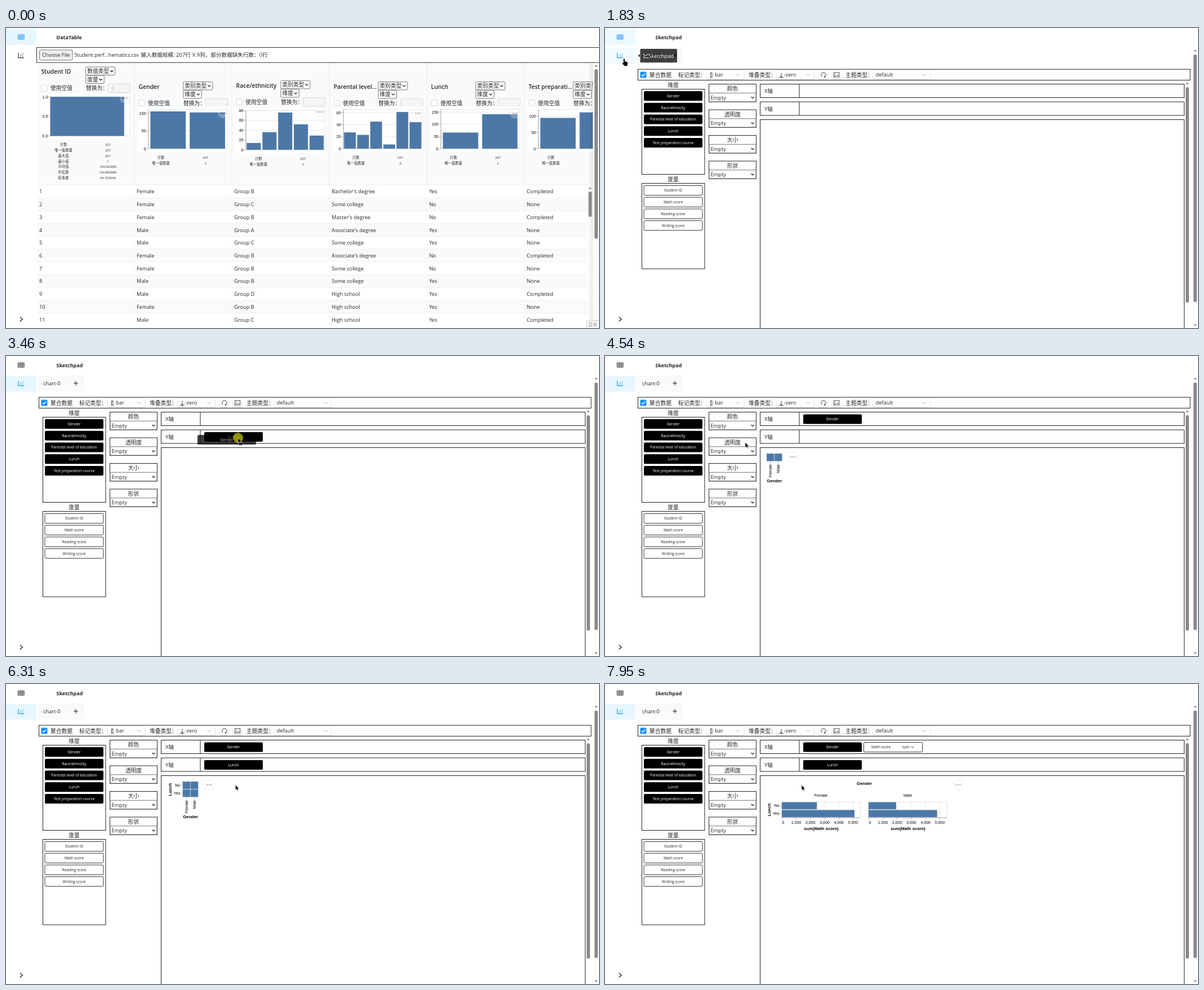
An HTML page for the animation above (8000 ms loop, 1053 by 532 pixels).

```html
<!DOCTYPE html>
<html lang="en">
<head>
<meta charset="utf-8">
<title>Data sketchpad</title>
<style>
html, body { margin: 0; height: 100%; overflow: hidden; background: #fff; }
svg { display: block; width: 100vw; height: 100vh; }
text { font-family: 'Open Sans', 'Noto Sans CJK SC', 'Noto Sans CJK', 'Noto Sans', sans-serif; fill: #262626; white-space: pre; }
text.v { font-family: 'Liberation Sans', Arial, sans-serif; fill: #000; }
</style>
</head>
<body>
<svg id="stage" viewBox="0 0 1053 532"></svg>
<script>
const BLUE = '#4c78a8', ACTIVE = '#1890ff';
const M = 'text-anchor="middle"', E = 'text-anchor="end"';

// y is the vertical middle of the text
const txt = (x, y, s, size = 9.25, attr = '') =>
  `<text x="${x}" y="${(y + size * .36).toFixed(2)}" font-size="${size}" ${attr}>${s}</text>`;
const vtxt = (x, y, s, size = 7, attr = M) => txt(x, y, s, size, 'class="v" ' + attr);
const up = (x, y, s, size, attr) => `<g transform="translate(${x} ${y}) rotate(-90)">${vtxt(0, 0, s, size, attr)}</g>`;
const box = (x, y, x2, y2, fill = 'none', stroke = 'none', r = 0, w = 1) =>
  `<rect x="${x}" y="${y}" width="${x2 - x}" height="${y2 - y}" rx="${r}" fill="${fill}" stroke="${stroke}" stroke-width="${w}"/>`;
const path = (d, stroke = '#333', w = 1, fill = 'none', attr = '') =>
  `<path d="${d}" stroke="${stroke}" stroke-width="${w}" fill="${fill}" ${attr}/>`;
const group = (id, s, attr = '') => `<g id="${id}" ${attr}>${s}</g>`;
const chevron = (x, y, c = '#222', w = 1.3, r = 2.5) =>
  path(`M${x - r} ${y - r / 2}l${r} ${r}l${r} ${-r}`, c, w);
const arrow = (x, y, dir) => path(`M${x - 3} ${y + dir * 1.6}h6l-3 ${-dir * 3.4}z`, 'none', 0, '#8b8b8b');
const thumb = (x, y, y2) => box(x, y, x + 6, y2, '#8b8b8b', 'none', 3);

function nativeSelect(x, y, w, label) {
  return box(x, y - 7.2, x + w, y + 7.2, '#fff', '#767676', 1.5) +
    txt(x + 2.5, y, label, 9.75) + chevron(x + w - 6, y);
}
function flatSelect(x, x2, label, tx) {
  return box(x + .5, 74.5, x2, 91.5, '#fff', '#e2e2e2', 1) + txt(tx, 83, label, 9.4) + chevron(x2 - 11, 83, '#aaa', .9, 3.3);
}
function moreButton(x, y, id = '', opacity = .25) {
  const dots = [-3.6, 0, 3.6].map(d => `<circle cx="${x + d}" cy="${y}" r="1.4" fill="#111"/>`).join('');
  return `<g id="${id}" opacity="${opacity}"><circle cx="${x}" cy="${y}" r="9.3" fill="#fff" stroke="#999" stroke-width=".8"/>${dots}</g>`;
}
function pill(cx, cy, label, dark) {
  return box(cx - 52, cy - 8.6, cx + 52, cy + 8.6, dark ? '#000' : '#fff', dark ? 'none' : '#333', 2.2) +
    txt(cx, cy, label, 6.6, M + ` style="fill:${dark ? '#fff' : '#222'}"`);
}

// ---------- data table ----------
const columns = [
  { name: 'Student ID', top: 77, id: 'bStudent', bx: 211, by: 124.5 },
  { name: 'Gender', id: 'bGender', bx: 385.5, by: 151, ticks: [0, 50, 100], unit: .63, bars: [105, 102], kinds: 2 },
  { name: 'Race/ethnicity', top: 102, id: 'bRace', bx: 557.5, by: 149, ticks: [0, 20, 40, 60, 80], unit: .87, bars: [14, 36, 76, 52, 29], kinds: 5 },
  { name: 'Parental level...', id: 'bParent', bx: 731, by: 151.5, ticks: [0, 20, 40, 60], unit: 1.067, bars: [27, 23, 45, 7, 61, 44], kinds: 6 },
  { name: 'Lunch', id: 'bLunch', bx: 904, by: 151.5, ticks: [0, 50, 100, 150], unit: .433, bars: [66, 141], kinds: 2 },
  { name: 'Test preparati...', id: 'bTest', bx: 1077, by: 151.5, ticks: [0, 50, 100], unit: .575, bars: [95, 112], kinds: 2 }
];
const B = "Bachelor's degree", S = 'Some college', A = "Associate's degree", H = 'High school';
const rows = [
  ['Female', 'B', B, 1, 1], ['Female', 'C', S, 0, 0], ['Female', 'B', "Master's degree", 0, 1],
  ['Male', 'A', A, 1, 0], ['Male', 'C', S, 1, 0], ['Female', 'B', A, 0, 1], ['Female', 'B', S, 0, 0],
  ['Male', 'B', S, 1, 0], ['Male', 'D', H, 1, 1], ['Female', 'B', H, 1, 0], ['Male', 'C', H, 1, 1]
];

function headerCell(c, i) {
  const x = 55 + 173.1 * i, num = i === 0, mid = c.top || 104;
  const s1 = num ? 76.3 : mid - 1.4, base = num ? 191.5 : i === 2 ? 216 : 214;
  let s = txt(x + 7.4, mid + .5, c.name, 10.4, 'font-weight="600"');
  s += nativeSelect(x + 86.7, s1, 52, num ? '数值类型' : '类别类型') + nativeSelect(x + 86.7, s1 + 15, 32.5, num ? '度量' : '维度');
  const y = s1 + 30.4;
  s += box(x + 8, y - 5, x + 18, y + 5, '#fff', '#d9d9d9', 1) + txt(x + 24, y, '使用空值', 9.75) + txt(x + 87, y, '替换为：', 9.75);
  s += box(x + 126.5, y - 7.7, x + 165.5, y + 7.7, '#f5f5f5', '#d9d9d9', 1);
  if (num) s += txt(x + 132, y, '0', 9.25, 'style="fill:#bbb"');
  const left = x + (num ? 23.8 : 24.8), w = num ? 140.5 : 139.6, top = base - 69.5;
  s += box(x + 6, top - 5, x + 166, base + 6, '#fff');
  const ticks = c.ticks || [0, .5, 1], unit = c.unit || 69.5;
  for (const v of ticks) {
    const ty = base - v * unit;
    s += path(`M${left} ${ty}h${w}`, '#ddd', .7) + path(`M${left - 3.5} ${ty}h3.5`, '#888', .7) +
      vtxt(left - 4.5, ty, num ? v.toFixed(1) : v, 7, E);
  }
  s += box(left, top, left + w, base, 'none', '#ddd', 0, .7);
  if (num) s += box(left, top, left + 131, base, BLUE);
  else {
    const step = w / c.bars.length;
    c.bars.forEach((v, k) => s += box(left + step * (k + .05), base - v * unit, left + step * (k + .95), base, BLUE));
  }
  s += path(`M${left} ${top}V${base}`, '#888', .7) + moreButton(c.bx, c.by, c.id);
  const stats = [['计数', 207], ['唯一值数量', num ? 207 : c.kinds]];
  if (num) stats.push(['最大值', 207], ['最小值', 1], ['平均值', '104.000000'], ['中位数', '104.000000'], ['标准差', '59.755056']);
  stats.forEach(([k, v], n) => {
    const sy = (num ? 207.2 : base + 15.7) + n * (num ? 9.75 : 10.3);
    s += txt(x + 47, sy, k, 6.3, M + ' font-weight="500"') + txt(x + 126, sy, v, 5.8, M + ' font-weight="500"');
  });
  return s + path(`M${x + 173} 62V279`, '#ececec', 1);
}

function tableScene() {
  let s = txt(89.5, 17, 'DataTable', 9, 'font-weight="700"');
  let body = box(55, 62, 1042, 278.5, '#fafafa') + columns.map(headerCell).join('');
  rows.forEach((r, i) => {
    const top = 278.5 + 22.72 * i;
    body += box(55, top, 1032, top + 22.72, i % 2 ? '#fafafa' : '#fff') + path(`M55 ${top}H1032`, '#f0f0f0');
    const cells = [i + 1, r[0], 'Group ' + r[1], r[2], r[3] ? 'Yes' : 'No', r[4] ? 'Completed' : 'None'];
    cells.forEach((v, k) => body += txt(59 + 173.1 * k, top + 11.6, v) + path(`M${228 + 173.1 * k} ${top}v22.7`, '#f5f5f5'));
  });
  s += `<g clip-path="url(#tableClip)">${body}</g>` + box(1032, 279, 1042, 532, '#fcfcfc');
  s += box(1034, 62, 1042.5, 532, 'url(#edge)') + arrow(1037.5, 284, 1) + thumb(1034.3, 290, 335);
  s += box(1043, 62, 1053, 532, '#fcfcfc') + arrow(1048, 67, 1) + thumb(1045, 73, 374) + arrow(1048, 527, -1);
  s += box(54.5, 34.5, 1056, 61.2, '#fff', '#333') + box(59.5, 39, 118, 57, '#efefef', '#767676', 2);
  s += txt(64, 48, 'Choose File', 9.3) + txt(121.5, 48, 'Student perf...hematics.csv', 9.1);
  s += txt(239.5, 48, '输入数据规模: 207行 X 9列，部分数据缺失行数：0行', 9.6);
  return s + group('menuTip', box(1031, 519, 1056, 535, '#f9f9f9', '#ccc') + txt(1034, 526, '菜单', 8, 'style="fill:#999"'));
}

// ---------- sketchpad ----------
const dims = ['Gender', 'Race/ethnicity', 'Parental level of education', 'Lunch', 'Test preparation course'];
const measures = ['Student ID', 'Math score', 'Reading score', 'Writing score'];

function padScene() {
  let s = txt(89.5, 17, 'Sketchpad', 9, 'font-weight="700"');
  s += box(55, 35, 109, 62, '#fafafa') + txt(66, 48.5, 'chart-0', 9.4) + box(111.5, 35, 137.5, 62, '#fafafa', '#f3f3f3');
  s += path('M120.3 48.2h7.6M124.1 44.4v7.6', '#222', 1.1);
  s += box(58.5, 73.2, 1039, 92.5, '#fff', '#222') + box(62.5, 77.5, 73.5, 88.5, ACTIVE, 'none', 1.5) + path('M65.2 83l2.2 2.3 3.6-4.5', '#fff', 1.4);
  s += txt(79, 83, '聚合数据', 9.75) + txt(130, 83, '标记类型：', 9.75) + flatSelect(180, 247, 'bar', 195) + box(187.5, 79.5, 190, 87.5, 'none', '#333', 0, .9);
  s += txt(255, 83, '堆叠类型：', 9.75) + flatSelect(303.5, 371.5, '-zero', 317.5) + path('M309 87.5h8M313 87V79.5M311.3 84.8l1.7 2 1.7-2', '#333', .9);
  s += box(380, 74.5, 396, 91.5, '#fff', '#e2e2e2', 1) + path('M385.6 86.4a4.1 4.1 0 1 1 4.4 .2M389.5 84.7v2.4h2.4', '#333', 1);
  s += box(403, 74.5, 419, 91.5, '#fff', '#e2e2e2', 1) + box(406.5, 79, 415.8, 87, 'none', '#333', 0, .9) + path('M407 86l2.7-3 2 2 1.5-1.6 2.3 2.4M408.5 81h1.2', '#333', .8);
  s += txt(427, 83, '主题类型：', 9.75) + flatSelect(475.5, 578, 'default', 480.5);
  s += txt(121, 101, '维度', 9.75, M) + box(65.5, 108.5, 177, 259.5, '#fff', '#222') + dims.map((d, i) => pill(121, 120.5 + 20.75 * i, d, 1)).join('');
  s += txt(121, 268, '度量', 9.75, M) + box(65.5, 275.5, 177, 427, '#fff', '#222') + measures.map((d, i) => pill(121, 288 + 20.75 * i, d)).join('');
  ['颜色', '透明度', '大小', '形状'].forEach((d, i) => {
    const y = 99.5 + 45.5 * i;
    s += box(184.5, y, 268.5, y + 31.5, '#fff', '#222') + txt(226.5, y + 8.2, d, 9.75, M);
    s += box(185, y + 15.8, 268, y + 31, '#fff', '#767676') + txt(187.5, y + 24, 'Empty', 9.3) + chevron(262, y + 23.7);
  });
  [['X轴', 99.5], ['Y轴', 131]].forEach(([d, y]) =>
    s += box(275.5, y, 1028.5, y + 24, '#fff', '#222') + path(`M345 ${y}v24`, '#222') + txt(283, y + 12.5, d, 9.5));
  s += box(275.5, 162.5, 1028.5, 540, '#fff', '#222');
  s += arrow(1034, 98, 1) + thumb(1031, 105, 487) + arrow(1048, 40, 1) + thumb(1045, 47, 486) + arrow(1048, 527, -1);
  s += group('chart1', cells(287, 1) + moreButton(334, 179));
  s += group('chart2', cells(313.8, 2) + up(291, 187, 'Lunch', 7.7, M + ' font-weight="700"') + moreButton(361, 179));
  s += group('chart3', facets());
  s += group('xGender', pill(404, 112, 'Gender', 1)) + group('yLunch', pill(404, 143.5, 'Lunch', 1));
  s += group('xMath', box(459.5, 103.5, 563.5, 120.7, '#fff', '#333', 2.2) + txt(473, 112, 'Math score', 6.6) + txt(527.5, 112, 'sum', 6.6) + chevron(546, 112, '#222', .9));
  return s;
}
function rowLabels(x, y) {
  return ['No', 'Yes'].map((d, i) => vtxt(x - 4.6, y + 14 * i, d, 7, E) + path(`M${x - 3.5} ${y + 14 * i}h3.5`, '#888', .7)).join('');
}
function cells(x, n) {
  const end = 173 + 14 * n;
  let s = '';
  for (let r = 0; r < n; r++) for (let c = 0; c < 2; c++)
    s += box(x + 14 * c, 173 + 14 * r, x + 14 * c + 13.4, 186.4 + 14 * r, BLUE, '#b9c9da', 0, .5);
  ['Female', 'Male'].forEach((d, c) =>
    s += path(`M${x + 6.7 + 14 * c} ${end}v3.5`, '#888', .7) + up(x + 6.7 + 14 * c, end + 5, d, 7, E));
  if (n > 1) s += rowLabels(x, 179.7);
  return s + vtxt(x + 13.8, end + 34.3, 'Gender', 7.7, M + ' font-weight="700"');
}
function facets() {
  const bold = M + ' font-weight="700"';
  let s = vtxt(460.5, 176, 'Gender', 7.7, bold) + up(291, 223, 'Lunch', 7.7, bold) + rowLabels(314, 215.7);
  [['Female', 314, 62.3, 129], ['Male', 468, 49, 121.7]].forEach(([d, x, no, yes]) => {
    s += vtxt(x + 69.5, 197, d) + box(x, 209, x + 139.5, 237, '#fff', '#ddd', 0, .8);
    for (let k = 0; k < 6; k++) {
      const gx = x + .4 + 25.2 * k;
      s += path(`M${gx} 209v28`, '#ddd', .7) + path(`M${gx} 237v3.5`, '#888', .7);
      s += vtxt(k ? gx : gx + 2, 245.5, k ? k + ',000' : 0);
    }
    s += box(x, 209.6, x + no, 222.2, BLUE) + box(x, 223.4, x + yes, 236.2, BLUE) + path(`M${x} 237h139.5`, '#888', .7);
    s += vtxt(x + 70, 256, 'sum(Math score)', 7.7, bold);
  });
  return s + moreButton(627, 179);
}

// ---------- sidebar, tooltip, pointer ----------
const sidebar = box(0, 0, 54, 532, '#fff') +
  group('item1', box(0, 2, 54, 30, '#e6f7ff')) + group('item2', box(0, 36, 54, 63, '#e6f7ff')) +
  group('icon1', '<path d="M21.5 12h10.6v8H21.5zM21.5 14.6h10.6M21.5 17.3h10.6M25 12v8M28.6 12v8"/>', 'fill="none" stroke-width=".9"') +
  group('icon2', '<path d="M22 44v8.6h10M25 49.4h1.5M27.3 46.6h1.5M28.7 49.8h1.5M30.4 46h1.5" stroke-width="1.2"/>', 'fill="none"') +
  path('M24.7 512.8l4.6 3.8-4.6 3.8', '#222', 1.3);
const tooltip = path('M62 46l-3.4 3 3.4 3z', 'none', 0, '#000') + box(62.5, 37, 128, 61.3, '#000', 'none', 1.5);
const tipLabel = path('M69 44.5v8.3h8M71 50l1.8-2.5 1.6 1.2 2-3', '#fff', 1) + txt(77, 49.4, 'Sketchpad', 9.4, 'style="fill:#fff"');
const pointer =
  group('press', '<circle r="9" fill="#ff0" opacity=".55"/>') +
  group('ban', '<circle r="4.6"/><path d="M-3.2-3.2l6.4 6.4"/>', 'fill="none" stroke="#222" stroke-width="1.7"') +
  group('arrow', path('M0 0V9.6L2.2 7.6 3.7 11 5.2 10.3 3.7 7.1H6.7Z', '#fff', .6, '#000')) +
  group('copy', box(1, 9, 8, 13, '#111', '#ddd', 0, .4)) +
  group('hand', path('M-1.3 0q1.3-1.4 2.5 0v4l4 1q1.4 .5 1.2 2.6l-.8 4.8h-5L-3.4 8q-.4-1.6 2.1-1z', '#fff', .4, '#000'));

document.getElementById('stage').innerHTML =
  `<defs><clipPath id="tableClip"><path d="M55 62H1042V532H55z"/></clipPath>
  <linearGradient id="edge"><stop offset="0" stop-color="#000" stop-opacity="0"/><stop offset="1" stop-color="#000" stop-opacity=".08"/></linearGradient></defs>` +
  group('table', tableScene()) + group('pad', padScene()) + sidebar +
  group('tip', `<g opacity=".75">${tooltip}</g>` + tipLabel) +
  [0, 1, 2].map(i => group('slot' + i, pill(0, 0, ['Gender', 'Lunch', 'Math score'][i], i < 2))).join('') +
  [0, 1, 2].map(i => group('ghost' + i, pill(0, 0, ['Gender', 'Lunch', 'Math score'][i], i < 2), 'opacity=".75"')).join('') +
  group('pointer', pointer);

// ---------- motion ----------
const track = [
  [70, 1053, 532], [460, 234, 200], [600, 234, 200], [950, 130, 140], [1210, 97, 90], [1430, 45, 60], [1530, 34, 55],
  [2290, 34, 55], [2700, 105, 136], [3040, 120, 118], [3300, 120, 118], [3460, 412, 145], [3580, 455, 148],
  [3850, 420, 113], [4060, 420, 112], [4160, 420, 112], [4830, 136, 180], [4900, 136, 180], [5230, 131, 175],
  [5450, 131, 175], [5710, 436, 161], [5840, 420, 145], [6060, 420, 145], [6240, 425, 170], [6700, 150, 305],
  [6840, 150, 305], [6990, 426, 175], [7060, 507, 160], [7220, 515, 113], [7450, 515, 113], [7810, 518, 118],
  [7860, 518, 118], [7950, 349, 179]
];
// offsets run from the pill's centre to the hand
const drags = [
  { from: 3300, to: 4060, at: 3460, a: [1, 2.5], b: [-20, 3.5] },
  { from: 5450, to: 5960, at: 5710, a: [-10, 8], b: [-9.5, 8] },
  { from: 6840, to: 7350, at: 7060, a: [-29, 3.5], b: [-38.5, 16.5] }
];
const clamp = v => Math.max(0, Math.min(1, v));
const ramp = (t, a, b) => clamp((t - a) / (b - a));
const mix = (a, b, k) => a + (b - a) * k;
const el = {};
document.querySelectorAll('[id]').forEach(n => el[n.id] = n);
const show = (id, on) => el[id].style.display = on ? '' : 'none';
const move = (id, x, y) => el[id].setAttribute('transform', `translate(${x.toFixed(2)} ${y.toFixed(2)})`);
const fade = (id, v) => el[id].setAttribute('opacity', v.toFixed(3));

function cursorAt(t) {
  let i = track.findIndex(k => k[0] > t);
  if (i < 0) return track[track.length - 1].slice(1);
  if (i === 0) return track[0].slice(1);
  const p = track[i - 1], q = track[i];
  let k = ramp(t, p[0], q[0]);
  k = k * k * (3 - 2 * k);
  return [mix(p[1], q[1], k), mix(p[2], q[2], k)];
}

function render(t) {
  const [x, y] = cursorAt(t), pad = t >= 1700;
  show('table', !pad);
  show('pad', pad);
  show('menuTip', t < 150);
  fade('bGender', mix(.25, 1, ramp(t, 280, 560)));
  fade('bStudent', mix(.25, 1, ramp(t, 650, 950)));
  fade('bRace', mix(.25, .55, ramp(t, 220, 460)));

  const swap = ramp(t, 1700, 1960);
  fade('item1', 1 - swap * (t < 2290 ? .5 : 1));
  fade('item2', mix(0, 1, swap));
  el.icon1.setAttribute('stroke', t < 2290 ? ACTIVE : '#222');
  el.icon2.setAttribute('stroke', t < 1500 ? '#222' : ACTIVE);
  fade('tip', ramp(t, 1560, 1700) - ramp(t, 2300, 2480));

  show('chart1', t >= 4130 && t < 6050);
  show('chart2', t >= 6050 && t < 7430);
  show('chart3', t >= 7430);
  show('xGender', t >= 4060);
  show('yLunch', t >= 5960);
  show('xMath', t >= 7350);

  const row = x < 345 ? 0 : y > 99 && y < 124 ? 112 : y > 131 && y < 155 ? 143.5 : 0;
  let held = false;
  drags.forEach((d, i) => {
    const on = t >= d.from && t < d.to, k = ramp(t, d.from, d.at);
    held = held || on;
    show('ghost' + i, on);
    show('slot' + i, on && row);
    move('ghost' + i, x + mix(d.a[0], d.b[0], k), y + mix(d.a[1], d.b[1], k));
    move('slot' + i, i === 2 ? 511.5 : 404, row);
  });
  const hand = !held && x < 50 && t < 2500;
  move('pointer', x, y);
  show('pointer', t >= 70);
  show('press', held);
  show('ban', held && !row);
  show('copy', held && row);
  show('arrow', !hand && !(held && !row));
  show('hand', hand);
}
function tick() {
  render(performance.now() % 8000);
  requestAnimationFrame(tick);
}
tick();
</script>
</body>
</html>
```
